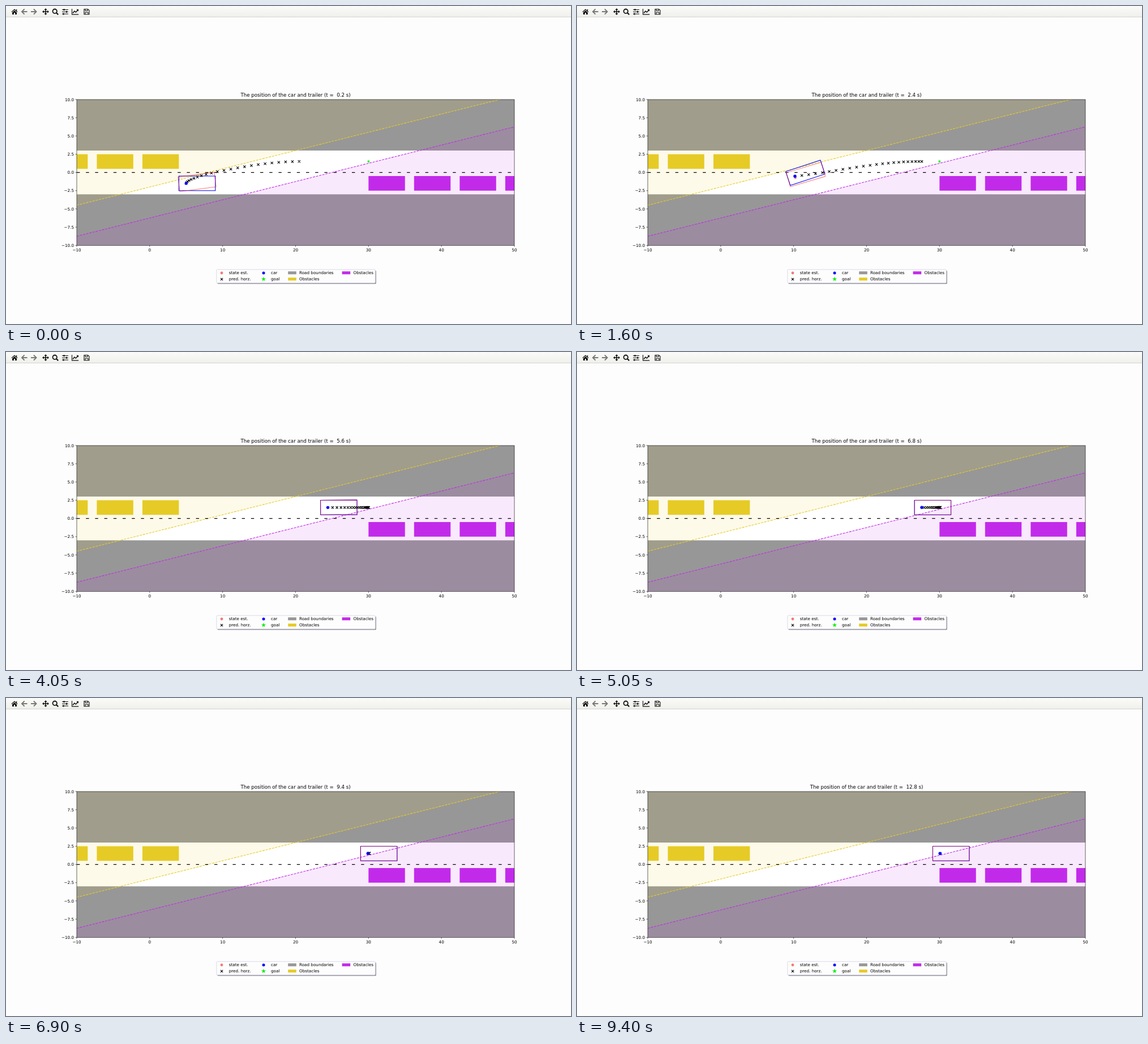
Recreate the animation shown at these times as an HTML page. Size 998 by 561 pixels, loop 9450 ms.

```html
<!DOCTYPE html>
<html lang="en">
<head>
<meta charset="utf-8">
<title>Car position</title>
<style>
  html, body { margin: 0; width: 100%; height: 100%; overflow: hidden; background: #fdfdfd; }
  svg { display: block; width: 100vw; height: 100vh; }
  text { font-family: "DejaVu Sans", sans-serif; font-size: 7.21px; fill: #000; white-space: pre; }
  #title { font-size: 8.65px; }
  .icon { fill: none; stroke: #111; stroke-width: 1.6; }
  .solid { fill: #111; stroke: none; }
  .gray { stroke: #777; stroke-width: 2; }
</style>
</head>
<body>
<svg viewBox="0 0 998 561">
  <defs>
    <linearGradient id="bar" x2="0" y2="1">
      <stop offset="0" stop-color="#fbfbf9"/><stop offset="1" stop-color="#efefeb"/>
    </linearGradient>
    <clipPath id="axes"><rect x="125" y="165" width="773" height="257.4"/></clipPath>
  </defs>
  <rect width="998" height="561" fill="#fdfdfd"/>
  <rect width="998" height="19.5" fill="url(#bar)"/>
  <path d="M0 19.5H998" stroke="#d6d6d0"/>
  <g class="icon">
    <path class="solid" d="M15 5.2 20.6 10.3 19.8 11.1 15 6.9 10.2 11.1 9.4 10.3ZM17.9 5.8H19.2V9L17.9 7.8ZM15 7.9 19 11.4V15H16.1V11.9H13.9V15H11V11.4Z"/>
    <path class="gray" d="M37.5 10H28.5M32.6 5.4 28 10 32.6 14.6M44 10H53M48.9 5.4 53.5 10 48.9 14.6"/>
    <path d="M65.5 10H74.5M70 5.5V14.5"/>
    <path class="solid" d="M70 4 72.6 6.9H67.4ZM70 16 72.6 13.1H67.4ZM64 10 66.9 7.4V12.6ZM76 10 73.1 7.4V12.6Z"/>
    <circle cx="86.2" cy="9.2" r="3.7" stroke-width="1.8"/>
    <path d="M89 12 92.2 15.2" stroke-width="2.2"/>
    <path d="M99 6.5H110M99 10.2H110M99 14H110" stroke-width="1.1"/>
    <path d="M102.5 5V8M107 8.7V11.7M101.5 12.5V15.5" stroke-width="2"/>
    <path d="M116.5 5V14.9H128.2" stroke-width="1.1"/>
    <path d="M118 12.4 121 9 123.3 11 127 7"/>
    <path class="solid" d="M124.4 5.8H128V9.4Z"/>
    <path d="M137.9 5.5H144.7L147 7.8V14.7H137.9Z" stroke-width="1.1"/>
    <path d="M140 5.5V8.5H144V5.5M140 14.5V11.3H145V14.5" stroke-width="1.1"/>
  </g>
  <g id="plot" clip-path="url(#axes)"></g>
  <g id="frame"></g>
  <text id="title" x="511.5" y="160" text-anchor="middle"></text>
  <g id="legend"></g>
</svg>
<script>
const LOOP = 9450, HORIZON = 22, GOAL = [30, 1.5];
const YELLOW = '#e6cb26', PURPLE = '#c22aea', GRAY = '#979797';
const px = x => 253.83 + x * 12.883;
const py = y => 293.6 - y * 12.87;
const byId = id => document.getElementById(id);

function add(parent, tag, attrs, text) {
  const el = document.createElementNS('http://www.w3.org/2000/svg', tag);
  for (const name in attrs) el.setAttribute(name, attrs[name]);
  if (text) el.textContent = text;
  parent.appendChild(el);
  return el;
}
const poly = pts => 'M' + pts.map(([x, y]) => px(x).toFixed(2) + ' ' + py(y).toFixed(2)).join('L');
const cross = (x, y) => `M${x - 2.1} ${y - 2.1}l4.2 4.2m0-4.2l-4.2 4.2`;
function star(x, y, r) {
  const pts = Array.from({ length: 10 }, (_, i) => {
    const a = i * Math.PI / 5, d = i % 2 ? r * 0.382 : r;
    return (x + d * Math.sin(a)).toFixed(2) + ' ' + (y - d * Math.cos(a)).toFixed(2);
  });
  return 'M' + pts.join('L') + 'Z';
}

// Static scene
const plot = byId('plot'), frame = byId('frame'), legend = byId('legend');
const area = (pts, fill, opacity = 1) => add(plot, 'path', { d: poly(pts) + 'Z', fill, 'fill-opacity': opacity });
const box = (x0, y0, x1, y1, fill) => area([[x0, y0], [x1, y0], [x1, y1], [x0, y1]], fill);

box(-10, -10, 50, 10, '#fff');
box(-10, 3, 50, 10, GRAY);
box(-10, -10, 50, -3, GRAY);
area([[-10, -4.5], [48, 10], [-10, 10]], YELLOW, 0.1);
area([[-10, -8.75], [50, 6.25], [50, -10], [-10, -10]], PURPLE, 0.1);
for (let i = 0; i < 3; i++) box(-1 - i * 6.25, 0.5, 4 - i * 6.25, 2.5, YELLOW);
for (let i = 0; i < 4; i++) box(30 + i * 6.25, -2.5, 35 + i * 6.25, -0.5, PURPLE);
const dashed = (y0, y1, stroke, dash) => add(plot, 'path', {
  d: poly([[-10, y0], [50, y1]]), stroke, 'stroke-width': 1.1, 'stroke-dasharray': dash
});
dashed(-4.5, 10.5, YELLOW, '4 1.73');
dashed(-8.75, 6.25, PURPLE, '4 1.73');
dashed(0, 0, '#000', '5.4 10.8');

add(frame, 'rect', { x: 125, y: 165, width: 773, height: 257.3, fill: 'none', stroke: '#000', 'stroke-width': 0.6 });
const label = v => v.replace('-', '\u2212');
for (let x = -10; x <= 50; x += 10) {
  add(frame, 'path', { d: `M${px(x)} 422.3v2.5`, stroke: '#000', 'stroke-width': 0.6 });
  add(frame, 'text', { x: px(x), y: 432.7, 'text-anchor': 'middle' }, label(String(x)));
}
for (let y = -10; y <= 10; y += 2.5) {
  add(frame, 'path', { d: `M125 ${py(y)}h-2.5`, stroke: '#000', 'stroke-width': 0.6 });
  add(frame, 'text', { x: 120, y: py(y) + 2.7, 'text-anchor': 'end' }, label(y.toFixed(1)));
}

add(legend, 'rect', { x: 373.4, y: 466.4, width: 280.4, height: 23.8, rx: 1.5, fill: '#8a8a92' });
add(legend, 'rect', { x: 371.9, y: 464.9, width: 280.4, height: 23.8, rx: 1.5, fill: '#fdfdfd', stroke: '#d0d0e4', 'stroke-width': 0.8 });
const entry = (x, y, text) => add(legend, 'text', { x, y: y + 2.5 }, text);
const patch = (x, y, fill) => add(legend, 'rect', { x, y: y - 2.6, width: 14.6, height: 5.1, fill });
add(legend, 'circle', { cx: 381, cy: 471, r: 2.4, fill: '#f47a74' });
add(legend, 'path', { d: cross(381, 482), stroke: '#000', 'stroke-width': 1.1 });
add(legend, 'circle', { cx: 455, cy: 471, r: 2.5, fill: '#00f' });
add(legend, 'path', { d: star(455, 481.8, 4.3), fill: '#0e0' });
patch(498.2, 470.8, GRAY);
patch(498.2, 481.8, YELLOW);
patch(593.6, 470.8, PURPLE);
entry(393.7, 470.8, 'state est.');
entry(393.7, 481.8, 'pred. horz.');
entry(468, 470.8, 'car');
entry(468, 481.8, 'goal');
entry(518, 470.8, 'Road boundaries');
entry(518, 481.8, 'Obstacles');
entry(613.5, 470.8, 'Obstacles');

// Moving parts
add(plot, 'path', { d: star(px(GOAL[0]), py(GOAL[1]), 3), fill: '#0e0' });
const outline = { fill: 'none', 'stroke-width': 1.08 };
const carBox = add(plot, 'path', { ...outline, stroke: '#00f' });
const estBox = add(plot, 'path', { ...outline, stroke: '#f00', 'stroke-opacity': 0.5 });
const estDot = add(plot, 'circle', { r: 2.4, fill: '#f00', 'fill-opacity': 0.5 });
const plan = add(plot, 'path', { ...outline, stroke: '#000' });
const carDot = add(plot, 'circle', { r: 2.7, fill: '#00f' });

// Time in ms, simulation step
const PACE = [[0, 0], [1600, 11.2], [3100, 21.3], [5050, 33.8], [6900, 46.4], [8350, 55.8], [9400, 63.5], [9450, 64]];
// Step, then value and slope for x, y and heading
const PATH = [
  [0, 5, 0, -1.5, 0, 0, 0.04],
  [11, 10.18, 0.945, -0.52, 0.28, 0.317, 0],
  [21, 19.57, 0.94, 1.4, 0.03, 0.037, -0.008],
  [33, 27.57, 0.37, 1.5, 0, 0, 0],
  [46, 29.92, 0.04, 1.5, 0, 0, 0],
  [55, 30.12, 0, 1.5, 0, 0, 0],
  [63, 30.08, 0, 1.5, 0, 0, 0]
];
// Step, then estimation error in x, y and heading
const ERROR = [[0, 0, 0, 0.13], [4, 0.05, -0.1, 0.06], [11, 0.05, -0.19, -0.03], [21, 0, 0.02, 0.004], [27, 0, 0, 0], [64, 0, 0, 0]];

function segment(table, k) {
  let i = 0;
  while (i < table.length - 2 && k >= table[i + 1][0]) i++;
  const a = table[i], b = table[i + 1], span = b[0] - a[0];
  return { a, b, span, t: Math.min(1, (k - a[0]) / span) };
}
function linear(table, k) {
  const { a, b, t } = segment(table, k);
  return a.slice(1).map((v, i) => v + (b[i + 1] - v) * t);
}
function pose(k) {
  const { a, b, span, t } = segment(PATH, k);
  return [1, 3, 5].map(c => {
    const ease = t * t * (3 - 2 * t);
    return a[c] + (b[c] - a[c]) * ease
      + span * (a[c + 1] * t * (1 - t) ** 2 - b[c + 1] * t * t * (1 - t));
  });
}
function carOutline([x, y, heading]) {
  const c = Math.cos(heading), s = Math.sin(heading);
  return poly([[-1, -1], [4, -1], [4, 1], [-1, 1]].map(([u, v]) => [x + u * c - v * s, y + u * s + v * c])) + 'Z';
}
function place(dot, [x, y]) {
  dot.setAttribute('cx', px(x));
  dot.setAttribute('cy', py(y));
}
function planPath(k, y) {
  const mix = Math.min(1, k / 11), power = 2 + mix, bend = 1.25 + 0.85 * mix;
  let d = '';
  for (let j = 1; j <= HORIZON; j++) {
    const u = j / HORIZON;
    const gap = (GOAL[1] - y) * (1 - u) ** power * (1 + bend * u);
    d += cross(px(pose(k + j)[0]), py(GOAL[1] - gap));
  }
  return d;
}

let shown = -1;
function draw(step) {
  if (step === shown) return;
  shown = step;
  const car = pose(step), error = linear(ERROR, step);
  const est = car.map((v, i) => v + error[i]);
  carBox.setAttribute('d', carOutline(car));
  estBox.setAttribute('d', carOutline(est));
  place(carDot, car);
  place(estDot, est);
  plan.setAttribute('d', planPath(step, car[1]));
  const time = ((step + 1) * 0.2).toFixed(1);
  byId('title').textContent = `The position of the car and trailer (t =  ${time} s)`;
}

const start = performance.now();
function tick() {
  const ms = (performance.now() - start) % LOOP;
  draw(Math.min(63, Math.floor(linear(PACE, ms)[0])));
  requestAnimationFrame(tick);
}
tick();
</script>
</body>
</html>
```
